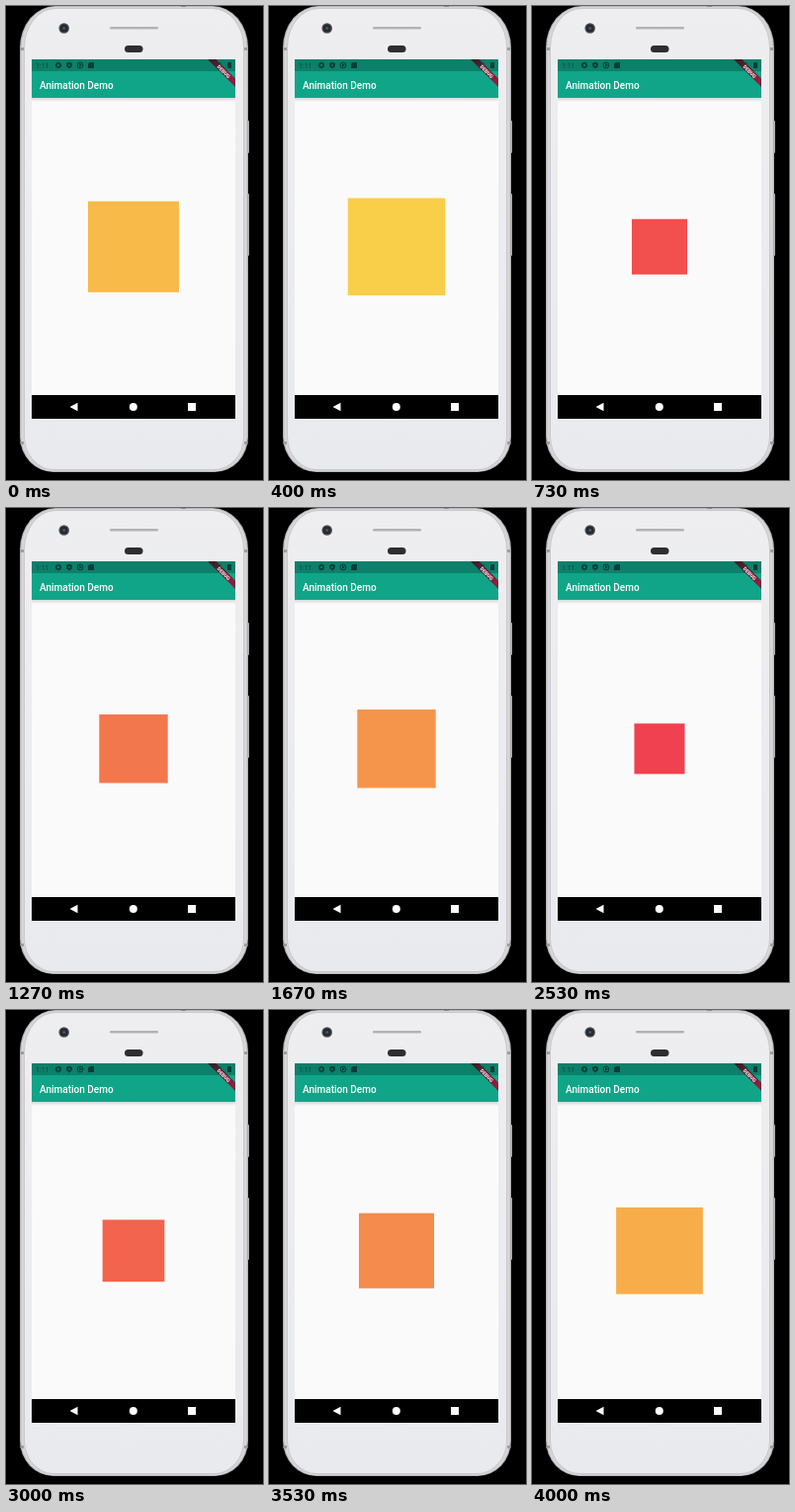
Recreate the animation shown at these times as an HTML page with a canvas. Size 260 px wide and 480 px high, loop 4.07 s.

```html
<!DOCTYPE html>
<html>
<head>
<meta charset="utf-8">
<title>Animation Demo</title>
<style>
html, body { margin: 0; width: 100%; height: 100%; overflow: hidden; background: #000; }
canvas { display: block; width: 260px; height: 480px; }
</style>
</head>
<body>
<canvas id="stage" width="260" height="480"></canvas>
<script>
const ctx = document.getElementById('stage').getContext('2d');
const LOOP = 4070, STEP = 1000 / 15, CYCLE = 2000, RESTART = 490;

function rect(x, y, w, h, color) {
  ctx.fillStyle = color;
  ctx.fillRect(x, y, w, h);
}

function round(x, y, w, h, r, color) {
  ctx.beginPath();
  ctx.roundRect(x, y, w, h, r);
  ctx.fillStyle = color;
  ctx.fill();
}

function dot(x, y, r, color) {
  ctx.beginPath();
  ctx.arc(x, y, r, 0, Math.PI * 2);
  ctx.fillStyle = color;
  ctx.fill();
}

function poly(points, color) {
  ctx.beginPath();
  points.forEach(([x, y]) => ctx.lineTo(x, y));
  ctx.closePath();
  ctx.fillStyle = color;
  ctx.fill();
}

function text(str, x, y, font, color) {
  ctx.font = font + ' Roboto, sans-serif';
  ctx.fillStyle = color;
  ctx.fillText(str, x, y);
}

function fade(x0, y0, x1, y1, from, to) {
  const g = ctx.createLinearGradient(x0, y0, x1, y1);
  g.addColorStop(0, from);
  g.addColorStop(1, to);
  return g;
}

// One layer of the phone, inset by dx at the sides and dy at the ends.
function shell(dx, dy, color) {
  const top = { x: 36 - dx, y: 42 - dy }, low = { x: 34 - dx, y: 36 - dy };
  round(14 + dx, dy, 231 - 2 * dx, 472 - 2 * dy, [top, top, low, low], color);
}

function drawPhone() {
  rect(0, 0, 260, 480, '#000');
  round(244, 116, 2, 33, 1, '#aeacae');
  round(244, 190, 2, 63, 1, '#aeacae');
  shell(0, 0, '#b1aeb0');
  shell(1.2, 0.8, '#d9d7d9');
  for (const y of [42, 441]) {
    rect(14.5, y, 3.5, 3, '#a09ea0');
    rect(241, y, 3.5, 3, '#a09ea0');
  }
  rect(177, 0, 5, 1, '#8f8d90');
  shell(4, 1.8, '#c9c8cc');
  shell(5, 3, fade(0, 0, 0, 472, '#eeeef0', '#e8eaee'));
  dot(58.7, 22.5, 5.3, '#55565b');
  dot(58.7, 22.5, 4, '#25282e');
  dot(58.7, 22.5, 1.6, '#46536a');
  round(105, 21, 49, 2.4, 1.2, '#b3b2b4');
  round(120, 40, 18.5, 7, 3.5, '#2e2e31');
}

function drawStatus() {
  const ink = '#0a3d36';
  text('1:11', 30, 62.5, '7px', '#0a4c41');
  ctx.strokeStyle = ink;
  ctx.lineWidth = 1.5;
  ctx.beginPath();
  ctx.arc(53, 60, 2, 0, Math.PI * 2);
  ctx.stroke();
  for (let i = 0; i < 8; i++) {
    const a = i * Math.PI / 4;
    dot(53 + 2.9 * Math.cos(a), 60 + 2.9 * Math.sin(a), 0.5, ink);
  }
  poly([[61, 58], [64, 56.7], [67, 58], [66.5, 61.2], [64, 63.5], [61.5, 61.2]], ink);
  dot(64, 60, 0.9, '#0d806a');
  ctx.lineWidth = 1;
  ctx.beginPath();
  ctx.arc(75, 60, 2.9, 0, Math.PI * 2);
  ctx.stroke();
  poly([[74, 58.2], [77, 59.7], [74, 61.7]], ink);
  poly([[84.8, 57], [89, 57], [89, 63], [83, 63], [83, 58.8]], ink);
  poly([[210, 57.5], [218, 57.5], [214, 63]], ink);
  round(224, 57, 4, 6, 0.6, ink);
}

function drawBanner() {
  poly([[204, 54], [212.5, 54], [232, 73.5], [232, 82]],
    fade(208, 56, 228, 76, '#3c2029', '#8a203d'));
  ctx.save();
  ctx.translate(220.3, 66.3);
  ctx.rotate(Math.PI / 4);
  ctx.textAlign = 'center';
  text('DEBUG', 0, 1.8, '900 5.1px', '#f4e8ea');
  ctx.restore();
}

function drawScreen() {
  rect(26, 54, 206, 364, '#fafafa');
  rect(26, 54, 206, 12, '#0c806a');
  rect(26, 66, 206, 27, '#10a588');
  rect(26, 93, 206, 4, fade(0, 93, 0, 97, '#d3d8d7', '#fafafa'));
  drawStatus();
  text('Animation Demo', 34, 83.5, '500 10px', '#fff');
  drawBanner();
  rect(26, 394, 206, 24, '#000');
  poly([[64.5, 406], [72.5, 401.7], [72.5, 410.3]], '#fff');
  dot(128.8, 406, 4, '#fff');
  rect(184, 402, 8, 8, '#fff');
}

function progress(t) {
  if (t < RESTART) return 0.84 + 0.16 * t / RESTART;
  return ((t - RESTART) % CYCLE) / CYCLE;
}

function drawSquare(p) {
  const size = 50 + 50 * p;
  const mix = (a, b) => Math.round(a + (b - a) * p);
  const color = `rgb(${mix(240, 249)}, ${mix(62, 210)}, ${mix(80, 72)})`;
  rect(129 - size / 2, 243.8 - size / 2, size, size, color);
}

function draw(now) {
  const step = Math.floor((now % LOOP + 4) / STEP);
  drawPhone();
  drawScreen();
  drawSquare(progress(Math.min(step, 60) * STEP));
  requestAnimationFrame(draw);
}

requestAnimationFrame(draw);
</script>
</body>
</html>
```
